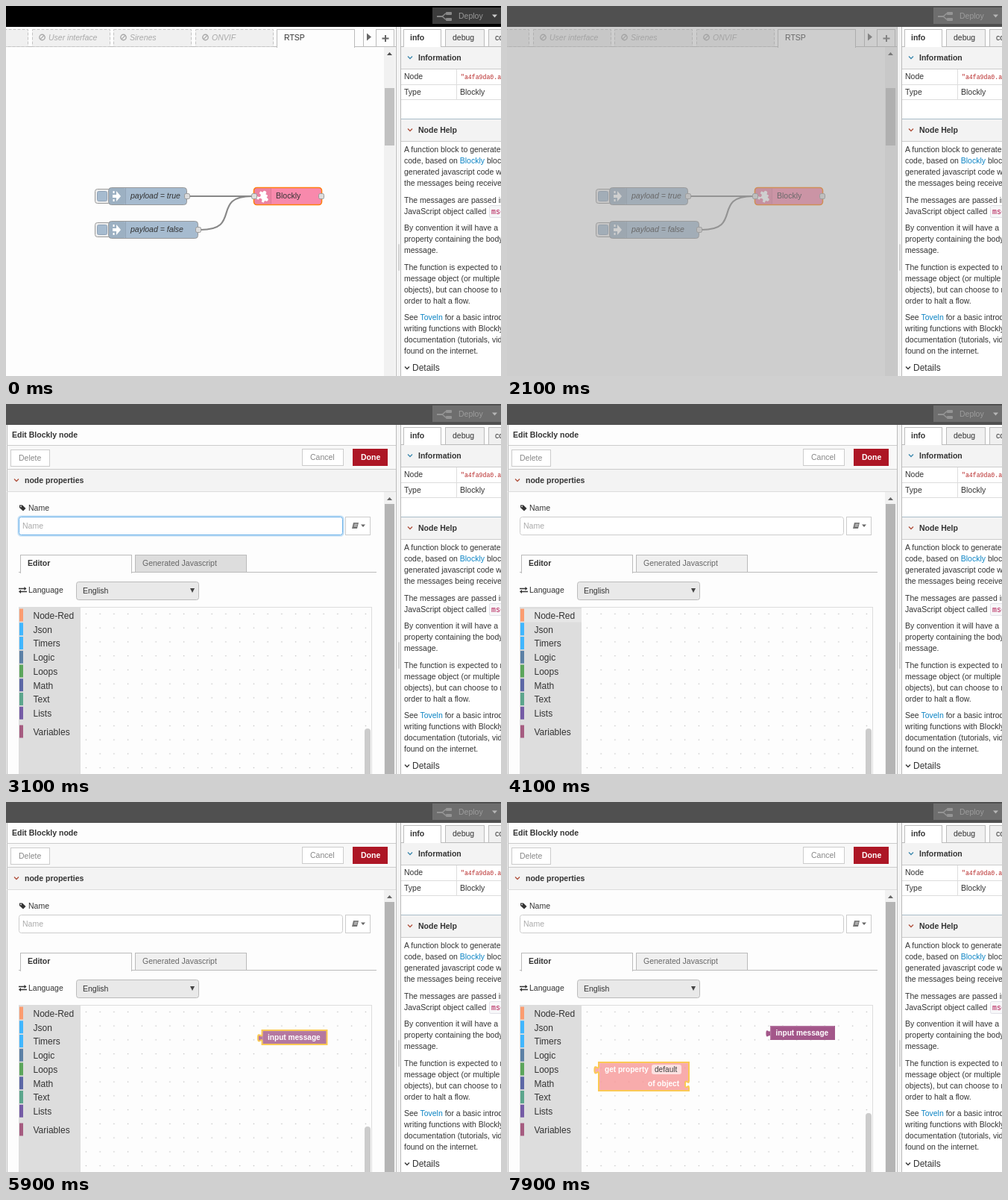
An HTML page that plays this animation: 664x496 px, repeating every 8 s.

```html
<!DOCTYPE html>
<html lang="en">
<head>
<meta charset="utf-8">
<title>Flow editor</title>
<style>
html, body { margin: 0; width: 100%; height: 100%; overflow: hidden; background: #fff; }
svg { display: block; width: 664px; height: 496px; }
text { font: 10.5px "Liberation Sans", Arial, sans-serif; fill: #333; white-space: pre; }
.b { font-weight: bold; }
.i { font-style: italic; }
.mono { font-family: "Liberation Mono", "DejaVu Sans Mono", monospace; }
.link { fill: #0c84c4; }
.row { font-size: 12px; }
.lab { font-size: 10.1px; font-weight: bold; fill: #fff; }
.field { font-size: 10.1px; fill: #111; }
</style>
</head>
<body>
<svg id="stage" viewBox="0 0 664 496" xmlns="http://www.w3.org/2000/svg"></svg>
<script>
const LOOP = 8000;

// Markup helpers
const rect = (x, y, w, h, fill, more = '') =>
  `<rect x="${x}" y="${y}" width="${w}" height="${h}" fill="${fill}" ${more}/>`;
const box = (x, y, w, h, fill, line, more = '') =>
  rect(x + .5, y + .5, w - 1, h - 1, fill, `stroke="${line}" ${more}`);
const path = (d, fill, line = 'none', width = 1, more = '') =>
  `<path d="${d}" fill="${fill}" stroke="${line}" stroke-width="${width}" ${more}/>`;
const hline = (x1, x2, y, c) => rect(x1, y, x2 - x1, 1, c);
const vline = (x, y1, y2, c) => rect(x, y1, 1, y2 - y1, c);
// y is the middle of the capitals
const text = (x, y, s, cls = '', fill = '', size = 10.5) =>
  `<text x="${x}" y="${y + size * .355}" class="${cls}"${fill && ` style="fill:${fill}"`}>${s}</text>`;
const group = (id, body, more = '') => `<g id="${id}" ${more}>${body}</g>`;
const chevron = (x, y, c) => path(`M${x - 3} ${y - 1.5}l3 3l3 -3`, 'none', c, 1.3);
const grip = (x) => rect(x, 319, 2, 36, '#d4d4d4', 'rx="1"');

// Workspace
function tab(x, name) {
  const w = 105, cx = x + 13.5;
  return box(x, 31, w, 24, '#f0f0f0', '#c4c4c4', 'stroke-dasharray="4 2"') +
    `<circle cx="${cx}" cy="42" r="3.7" fill="none" stroke="#a8a8a8" stroke-width="1.4"/>` +
    path(`M${cx - 2.6} 44.6l5.2 -5.2`, 'none', '#a8a8a8', 1.3) +
    text(x + 22, 42, name, 'i', '#a8a8a8');
}
const port = (x, y) => box(x - 4, y - 4, 8, 8, '#ddd', '#999', 'rx="2"');
function inject(y, w, label) {
  return box(119, y - 10, 22, 20, '#eee', '#999', 'rx="3"') +
    box(122, y - 7, 14, 14, '#a6bbcf', '#8fa3b8', 'rx="2"') +
    box(137, y - 12, w, 24, '#a6bbcf', '#999', 'rx="4"') +
    rect(138, y - 11, 22, 22, '#000', 'opacity=".06" rx="3"') + vline(160, y - 11, y + 11, '#93a6b9') +
    path(`M143 ${y - 2}h5v-5l6 7l-6 7v-5h-5z`, '#fff') +
    path(`M144.5 ${y - 7}v14`, 'none', '#fff', 2, 'stroke-dasharray="3 8"') +
    text(167, y - .5, label, 'i') + port(137 + w, y);
}
function workspace() {
  const puzzle = path('M-5 -4h3c-1 -4 5 -4 4 0h3v3c4 -1 4 5 0 4v3h-3c1 -4 -5 -4 -4 0h-3v-3c4 1 4 -5 0 -4z',
    '#fff', 'none', 1, 'transform="translate(344 255) rotate(30) scale(1.15)"');
  return rect(0, 28, 524, 468, '#fdfdfd') +
    hline(0, 524, 54, '#bbb') + tab(-75, '') + tab(35, 'User interface') + tab(144, 'Sirenes') + tab(254, 'ONVIF') +
    box(363, 31, 105, 25, '#fdfdfd', '#bbb') + rect(364, 54, 103, 3, '#fdfdfd') + text(373, 42, 'RTSP') +
    vline(479, 31, 54, '#bbb') + path('M484 36.5l6 5l-6 5z', '#666') +
    box(496, 31, 25, 24, '#fdfdfd', '#bbb') + path('M504.5 43.5h9M509 39v9', 'none', '#666', 2) +
    rect(507, 55, 15, 441, '#f1f1f1') + path('M511 66l3.5 -4l3.5 4z', '#505050') + rect(508, 110, 13, 77, '#c1c1c1') +
    path('M246 255H330M261 300C317 300 274 255 330 255', 'none', '#888', 2.2) +
    inject(255, 106, 'payload = true') + inject(300, 121, 'payload = false') +
    rect(332.5, 243.5, 91, 23, '#f889ac', 'stroke="#ff7f0e" stroke-width="1.6" rx="4"') +
    rect(333.5, 244.5, 22, 21, '#000', 'opacity=".05"') + vline(355, 244.5, 265.5, '#dd7898') +
    puzzle + text(362, 254.5, 'Blockly') + port(333, 255) + port(423, 255);
}
function header() {
  const icon = rect(578, 13, 8, 2, '#888') + rect(590, 8, 8, 4, '#888', 'rx="1"') + rect(590, 16, 8, 4, '#888', 'rx="1"') +
    path('M584 14c4 0 3 -4 7 -4M584 14c4 0 3 4 7 4', 'none', '#888', 1.3);
  return rect(0, 0, 664, 28, '#000') + rect(572, 2, 92, 22, '#3c3c3c') + icon +
    text(607, 13, 'Deploy', '', '#999') + path('M652 11.5h7l-3.5 4z', '#ccc');
}

// Sidebar
function sidebar() {
  const link = s => `<tspan class="link">${s}</tspan>`;
  const paras = [
    [192, 'A function block to generate', `code, based on ${link('Blockly')} blocks`, 'generated javascript code will', 'the messages being received'],
    [260, 'The messages are passed in as', 'JavaScript object called'],
    [297, 'By convention it will have a', 'property containing the body of', 'message.'],
    [350, 'The function is expected to return', 'message object (or multiple message', 'objects), but can choose to return', 'order to halt a flow.'],
    [417, `See ${link('Toveln')} for a basic introduction`, 'writing functions with Blockly.', 'documentation (tutorials, videos', 'found on the internet.']
  ];
  const section = (y, name, c) => rect(530, y, 134, 29, '#f3f3f3') + hline(530, 664, y + 29, '#ccc') +
    chevron(542, y + 14, c) + text(553, y + 14.5, name, 'b');
  return rect(524, 28, 140, 468, '#fff') + rect(524, 28, 5, 468, '#f4f4f4') +
    vline(523, 28, 496, '#bbb') + vline(529, 28, 496, '#bbb') + grip(526) +
    hline(530, 664, 54, '#bbb') + box(533, 31, 51, 25, '#fff', '#bbb') + rect(534, 54, 49, 2, '#fff') +
    `<rect id="debug" x="589.5" y="31.5" width="52" height="23" stroke="#bbb"/>` +
    box(647, 31, 40, 24, '#f0f0f0', '#bbb') +
    text(542, 42, 'info', 'b') + text(599, 42, 'debug') + text(656, 42, 'config') +
    section(55, 'Information', '#3a87ad') + section(152, 'Node Help', '#b0503c') + hline(530, 664, 151, '#a9bcc9') +
    text(534, 94, 'Node') + text(534, 115, 'Type') + text(609, 115, 'Blockly') +
    `<text x="610" y="98" class="mono" style="font-size:8.2px;fill:#b72828">"a4fa9da0.a</text>` +
    hline(530, 664, 105, '#ddd') + hline(530, 664, 125, '#ddd') + vline(604, 85, 125, '#ddd') +
    paras.map(([y, ...lines]) => lines.map((s, i) => text(534, y + i * 15, s)).join('')).join('') +
    box(648, 267, 30, 17, '#f7f7f9', '#e1e1e8', 'rx="2"') +
    `<text x="651" y="279" class="mono" style="font-size:10px;fill:#b0104c">msg</text>` +
    chevron(538, 485, '#333') + text(545, 485, 'Details', 'row', '', 12);
}

// Blocks: origin is the top left corner of the body
function block(w, h, fill, labels, { out = true, sockets = [], fields = [] } = {}) {
  const side = sockets.map(y => `V${y + 3}c0 6 -5 -5 -5 4.5s5 -1.5 5 4.5`).join('');
  const left = out ? 'V15c0 -6 -5.6 5 -5.6 -4.7s5.6 1.5 5.6 -4.7' : '';
  const d = `M0 0H${w}${side}V${h}H0${left}z`;
  return path(d, fill) + path(`M.7 ${h - 1}V.7H${w - 1}`, 'none', '#fff', 1, 'opacity=".25"') +
    fields.map(([x, y, fw, s]) => rect(x, y - 6.5, fw, 13, '#fff', 'opacity=".65" rx="3"') + text(x + 4, y, s, 'field', '', 10.1)).join('') +
    labels.map(([x, y, s]) => text(x, y, s, 'lab', '', 10.1)).join('') +
    path(d, 'none', '#fbbd2a', 2, 'class="sel" display="none"');
}
const at = (id, x, y, body) => group(id, body, `transform="translate(${x} ${y})"`);
const PURPLE = '#a3578a', SALMON = '#f89898';
const inputMsg = () => block(87, 19, PURPLE, [[7.5, 9.5, 'input message']]);
const getProp = () => block(121, 38, SALMON, [[8, 9.5, 'get property'], [66, 28.5, 'of object']],
  { sockets: [22], fields: [[71, 9.5, 40, 'default']] });

function flyouts() {
  const back = w => rect(100, 273, w, 223, '#ddd', 'opacity=".8"');
  const setProp = (c, name) => block(150, 38, c, [[8, 9.5, 'set property'], [98, 28.5, name]],
    { out: false, sockets: [22], fields: [[71, 9.5, 40, 'default']] });
  return group('flyA', back(201) +
      at('a1', 106, 279, block(170, 41, SALMON, [[8, 10, 'send message'], [8, 30.5, 'to output']],
        { out: false, sockets: [2], fields: [[64, 30.5, 14, '1']] })) +
      at('a2', 111.5, 338, inputMsg()) +
      at('a3', 111.5, 375, getProp()) + at('a4', 106, 431, setProp(SALMON, 'to value'))) +
    group('flyB', back(183) +
      at('b1', 111.5, 279, block(156, 19, SALMON, [[8, 9.5, 'convert JSON to object']], { sockets: [2] })) +
      at('b2', 111.5, 316, block(155, 19, SALMON, [[8, 9.5, 'convert object to JSON']], { sockets: [2] })) +
      at('b3', 111.5, 353, getProp()) + at('b4', 106, 409, setProp(SALMON, 'of object')));
}

// Edit panel
const ROWS = [
  ['Node-Red', '#fb9c70'], ['Json', '#40b6ff'], ['Timers', '#40b6ff'], ['Logic', '#5b80a5'], ['Loops', '#5ba55b'],
  ['Math', '#5b67a5'], ['Text', '#5ba58c'], ['Lists', '#745ba5'], ['Variables', '#a55b80']
];
function editor() {
  const rows = ROWS.map(([name, c], i) => {
    const y = 283.5 + i * 18.75 + (i === 8 ? 6 : 0);
    return `<rect id="row${i}" x="17" y="${y - 9}" width="83" height="18" fill="none"/>` +
      rect(17, y - 9, 6, 17, c) + `<g id="name${i}">${text(36.5, y, name, 'row', 'inherit', 12)}</g>`;
  }).join('');
  return `<g clip-path="url(#canvasClip)">` + rect(17, 272, 474, 224, '#fdfdfd') +
    rect(100, 273, 391, 223, 'url(#dots)') +
    `<rect id="bar" x="481" width="8" height="90" rx="4" fill="#ccc"/>` +
    at('msg', 0, 0, inputMsg()) + flyouts() + rect(17, 272, 83, 224, '#ddd') + rows +
    at('prop', 123, 349, getProp()) + '</g>' + box(17, 272, 474, 240, 'none', '#ddd');
}
function panel() {
  const button = (x, y, w, s, fill, line, ink, cls = '') => box(x, y, w, 23, fill, line) + text(x + 11, y + 11.5, s, cls, ink);
  const tag = path('M18 135.5h4l4.5 4.5l-3.5 3.5l-5 -4.5z', '#333') + '<circle cx="20" cy="137.4" r=".9" fill="#fff"/>';
  const swap = path('M17 247.5h9M19 251.5h9', 'none', '#333', 1.3) + path('M24.5 245l3 2.5l-3 2.5zM20 249l-3 2.5l3 2.5z', '#333');
  const book = path('M466 159h7l-2 8h-7z', '#777') + path('M467.3 161.3h4M466.7 163.5h4', 'none', '#fff', .8);
  return rect(-5, 28, 6, 468, '#f5f5f5') + vline(-5, 28, 496, '#ccc') + grip(-3) +
    rect(1, 28, 523, 468, '#fdfdfd') + vline(1, 28, 496, '#bbb') +
    text(8, 41, 'Edit Blockly node', 'b') + hline(1, 524, 55, '#ccc') + rect(2, 56, 522, 31, '#f8f8f8') +
    button(6, 61, 53, 'Delete', '#fff', '#ccc', '#888') + button(397, 60, 56, 'Cancel', '#fff', '#ccc', '#888') +
    button(465, 60, 47, 'Done', '#ad1625', '#ad1625', '#fff', 'b') +
    hline(1, 524, 87, '#ccc') + rect(2, 88, 522, 29, '#f3f3f3') + hline(1, 524, 117, '#ddd') +
    chevron(14, 102, '#b0503c') + text(25, 102, 'node properties', 'b') +
    rect(507, 118, 15, 378, '#f1f1f1') + path('M511 129l3.5 -4l3.5 4z', '#666') + rect(508, 134, 13, 362, '#b4b4b4') +
    tag + text(30, 139, 'Name') +
    `<rect id="glow" x="16.5" y="150.5" width="436" height="26" rx="4" fill="none" stroke="#66afe9" stroke-width="2.5" opacity=".35"/>` +
    `<rect id="field" x="17.5" y="151.5" width="434" height="24" rx="3" fill="#fff"/>` +
    text(22, 163, 'Name', '', '#aaa') + group('caret', rect(22, 157, 1, 12, '#000')) +
    box(455, 151, 34, 25, '#fff', '#ccc') + book + path('M476 161.5h6l-3 3.5z', '#666') +
    `<rect id="gen" x="173.5" y="202.5" width="149" height="23" stroke="#bbb"/>` + hline(17, 497, 225, '#bbb') +
    box(19, 202, 150, 25, '#fdfdfd', '#bbb') + rect(20, 225, 148, 3, '#fdfdfd') +
    text(29, 213, 'Editor', 'b') + text(183, 213, 'Generated Javascript', '', '#666') +
    swap + text(30, 249.5, 'Language') +
    box(94, 238, 165, 25, '#e9e9e9', '#bbb', 'rx="3"') + text(103, 250.5, 'English') + path('M247 247h6l-3 6z', '#444') +
    editor();
}

const stage = document.getElementById('stage');
stage.innerHTML = `<defs>
  <clipPath id="panelClip"><rect x="0" y="28" width="523.5" height="468"/></clipPath>
  <clipPath id="canvasClip"><rect x="17" y="272" width="474" height="224"/></clipPath>
  <pattern id="dots" x="98" y="272" width="18.75" height="18.75" patternUnits="userSpaceOnUse">
    <circle cx="9.4" cy="9.4" r=".8" fill="#bcbcbc"/></pattern></defs>` +
  workspace() + header() +
  group('shade', rect(0, 0, 664, 28, '#a0a0a0') + rect(0, 28, 524, 468, '#a0a0a0'), 'opacity=".5"') +
  `<g clip-path="url(#panelClip)">${group('panel', panel())}</g>` + sidebar();

const $ = id => document.getElementById(id);
const show = (id, on) => $(id).setAttribute('display', on ? 'inline' : 'none');
const set = (id, name, v) => $(id).setAttribute(name, v);
const select = (id, on) => $(id).querySelector('.sel').setAttribute('display', on ? 'inline' : 'none');
const move = (id, x, y) => set(id, 'transform', `translate(${x} ${y})`);
const mix = (a, b, k) => a + (b - a) * k;

// Block being dragged out of the first flyout, then settling
function msgPlace(t) {
  if (t <= 5900) {
    const k = Math.max(0, (t - 5300) / 600), e = k * k * (3 - 2 * k);
    return [mix(111.5, 343.5, e), mix(338, 306, e)];
  }
  const k = Math.min(1, (t - 5900) / 200);
  return [mix(343.5, 353, k), mix(306, 300, k)];
}

function update(time) {
  const t = Math.floor(time / 100) * 100;
  const during = (a, b) => t >= a && t < b;
  set('debug', 'fill', during(300, 400) ? '#ddd' : '#f0f0f0');
  show('shade', t >= 2100);
  show('panel', t >= 2300);
  move('panel', t < 2400 ? 146 : t < 2500 ? 6 : 0, 0);

  const focus = t < 4100;
  show('glow', focus);
  set('field', 'stroke', focus ? '#66afe9' : '#ccc');
  show('caret', during(2400, 2800) || during(3300, 3800));
  set('gen', 'fill', during(3100, 3300) ? '#ddd' : '#f0f0f0');

  const openA = during(4400, 5400), openB = during(6800, 7800);
  [[openA, during(3700, 4400)], [openB, during(6400, 6800)]].forEach(([open, hover], i) => {
    set('row' + i, 'fill', open ? ROWS[i][1] : hover ? '#e6e6e6' : 'none');
    set('name' + i, 'fill', open ? '#fff' : '#333');
  });
  for (let i = 2; i < ROWS.length; i++) set('name' + i, 'fill', '#333');
  show('flyA', openA);
  show('flyB', openB);
  select('a2', t >= 4900);
  select('b2', during(7200, 7400));
  select('b3', t >= 7500);

  show('msg', t >= 5400);
  move('msg', ...msgPlace(t));
  set('msg', 'opacity', t < 6100 ? .8 : 1);
  select('msg', t < 7800);
  set('bar', 'y', t < 6100 ? 435 : 417);

  show('prop', t >= 7800);
  move('prop', t < 7900 ? 116 : 123, t < 7900 ? 352 : 349);
  set('prop', 'opacity', .8);
  select('prop', true);
}

const start = performance.now();
function tick() {
  update((performance.now() - start) % LOOP);
  requestAnimationFrame(tick);
}
tick();
</script>
</body>
</html>
```
